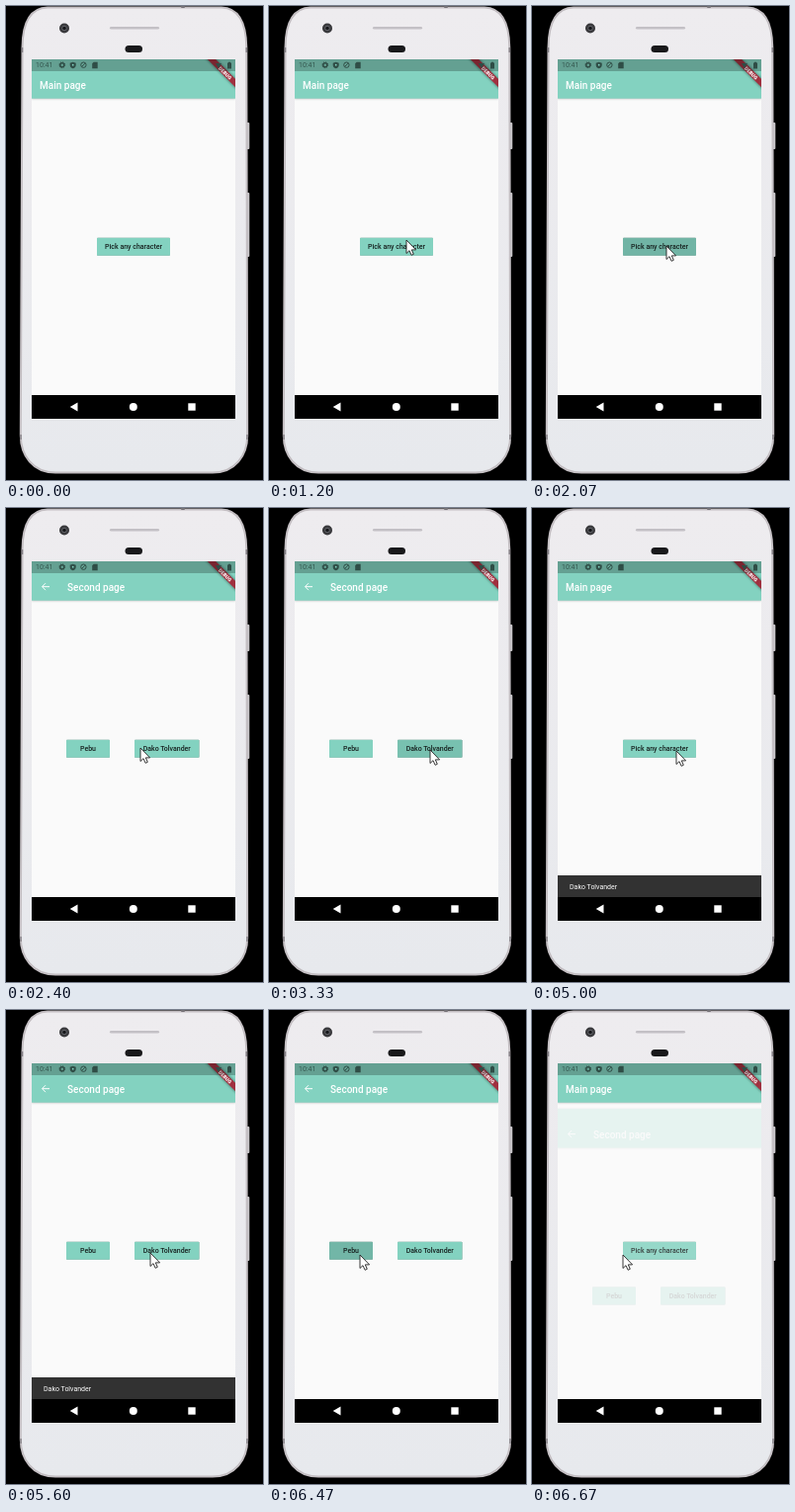
An HTML page that plays this animation: 260 by 480 pixels, repeating every 6740 ms.

```html
<!DOCTYPE html>
<html lang="en">
<head>
<meta charset="utf-8">
<style>
  html, body { margin: 0; width: 100%; height: 100%; overflow: hidden; background: #000; }
  svg { display: block; width: 260px; height: 480px; }
  text { font: 500 7px Roboto, sans-serif; fill: #16201e; }
  .title { font-size: 10px; fill: #fff; }
  .teal { fill: #83d2c0; }
  .raised { filter: drop-shadow(0 .8px .7px #0006); }
  .bar { filter: drop-shadow(0 .8px 1px #0005); }
  .snack text { font-weight: 400; fill: #fff; }
  .press { opacity: 0; }
</style>
</head>
<body>
<svg id="stage" viewBox="0 0 260 480"></svg>
<script>
const LOOP = 6740, STEP = 1000 / 15;
const PICKS = { short: 'Pebu', long: 'Dako Tolvander' };

const button = (id, x, width, label) => `
  <rect class="teal raised" x="${x}" y="234.700" width="${width}" height="18" rx=".8"/>
  <rect class="press" id="${id}" x="${x}" y="234.700" width="${width}" height="18" rx=".8"/>
  <text x="${x + width / 2}" y="246.300" text-anchor="middle">${label}</text>`;

const page = (id, title, titleX, content) => `
  <g id="${id}">
    <rect x="26" y="54" width="206" height="340" fill="#fafafa"/>
    <rect class="teal bar" x="26" y="54" width="206" height="39.700"/>
    <text class="title" x="${titleX}" y="83.800">${title}</text>
    ${content}
    <g class="snack">
      <rect x="26" y="372" width="206" height="22" fill="#323232"/>
      <text x="38" y="385.500">${PICKS.long}</text>
    </g>
  </g>`;

const phone = `
  <linearGradient id="shell" x2="0" y2="1">
    <stop stop-color="#eeecef"/><stop offset="1" stop-color="#e7e9ed"/>
  </linearGradient>
  <rect x="242" y="118" width="4.300" height="27" rx="1" fill="#c9c6ca"/>
  <rect x="242" y="189" width="4.300" height="65" rx="1" fill="#c9c6ca"/>
  <path d="M42 1.500C24 2 16.700 18 16.500 42L14.800 435C14.800 455 27 472.500 50 472.500H209
    C232 472.500 244.200 455 244.200 435L243.300 42C243 18 236 2 218 1.500Z"
    fill="url(#shell)" stroke="#c5c0c4" stroke-width="2"/>
  <path d="M16.500 42v5M243.300 42v5M15 434v5M244 434v5" stroke="#858186" stroke-width="1.500"/>
  <circle cx="59" cy="22.500" r="5" fill="#38383b"/>
  <circle cx="59" cy="22.500" r="2.300" fill="#17181b" stroke="#66676d"/>
  <rect x="105" y="21" width="50" height="2.500" rx="1.200" fill="#c3c0c5"/>
  <rect x="120.500" y="40" width="17.500" height="7" rx="3.500" fill="#19191b"/>
  <rect x="177" y="0" width="4" height="2" rx="1" fill="#77757a"/>`;

const debugBanner = `
  <g transform="translate(232 54) rotate(45)">
    <rect x="-30" y="14" width="60" height="6" fill="#a0303f" style="filter:drop-shadow(0 0 1.500px #0008)"/>
    <text x="2.500" y="19" text-anchor="middle" style="font-size:5.100px;font-weight:900;fill:#fff">DEBUG</text>
  </g>`;

const statusBar = `
  <rect x="26" y="54" width="206" height="12" opacity=".24"/>
  <g fill="#2f4d46" stroke="#2f4d46">
    <text x="30" y="62.300" stroke="none" style="fill:#34564e;font-weight:400">10:41</text>
    <circle cx="56.800" cy="59.700" r="2" fill="none" stroke-width="1.500"/>
    <circle cx="56.800" cy="59.700" r="2.900" fill="none" stroke-width="1" stroke-dasharray="1.100 1.180"/>
    <path d="M64.700 57.700l3-1 3 1v2q0 2.500-3 3.500-3-1-3-3.500z" stroke="none"/>
    <circle cx="67.700" cy="59.700" r=".9" fill="#83d3c1" stroke="none"/>
    <circle cx="78.400" cy="59.700" r="2.700" fill="none"/>
    <path d="M76.900 61.200l3-3"/>
    <path d="M87.200 58.200l1.500-1.500h4v6.500h-5.500z" stroke="none"/>
    <path d="M212 58h6l-3 5zM224 57.500h1v-.7h2v.7h1v6h-4z" stroke="none"/>
  </g>`;

const navBar = `
  <rect x="26" y="394" width="206" height="24"/>
  <g fill="#fff">
    <path d="M64.700 406l7.800-4.500v9z"/>
    <circle cx="128.800" cy="406" r="4"/>
    <rect x="184.300" y="402.300" width="7.400" height="7.400"/>
  </g>`;

const backArrow = '<path d="M44 79.700H36.800M40 76.200l-3.500 3.500 3.500 3.500" fill="none" stroke="#fff"/>';

stage.innerHTML = `
  <clipPath id="screen"><rect x="26" y="54" width="206" height="364"/></clipPath>
  ${phone}
  <g clip-path="url(#screen)">
    ${page('mainPage', 'Main page', 34, button('pickPress', 92, 74, 'Pick any character'))}
    ${page('secondPage', 'Second page', 62, backArrow
      + button('shortPress', 61, 44, PICKS.short) + button('longPress', 130, 65.5, PICKS.long))}
    ${debugBanner}${statusBar}${navBar}
  </g>
  <path id="cursor" d="M0 0V13.500L3 10.700 5.100 15.300 7.300 14.300 5.300 9.900H9.600Z"
    fill="#fff" stroke="#222" stroke-width=".9" stroke-linejoin="round"/>`;

const ramp = (t, from, to) => Math.min(1, Math.max(0, (t - from) / (to - from)));
const smooth = u => u * u * (3 - 2 * u);
const bump = (t, from, to) => Math.sin(Math.PI * ramp(t, from, to));

// Timing function of a CSS cubic-bezier, solved by bisection
const bezier = (x1, y1, x2, y2) => x => {
  const at = (a, b, s) => 3 * a * s * (1 - s) ** 2 + 3 * b * s * s * (1 - s) + s ** 3;
  let lo = 0, hi = 1;
  for (let i = 0; i < 24; i++) {
    const mid = (lo + hi) / 2;
    at(x1, x2, mid) < x ? lo = mid : hi = mid;
  }
  return at(y1, y2, (lo + hi) / 2);
};
const fastOutSlowIn = bezier(.4, 0, .2, 1), easeIn = bezier(.42, 0, 1, 1);

// Cursor stops: time, x, y
const PATH = [
  [600, 195, 25], [1200, 139, 237], [1535, 139, 237], [1733, 136, 243],
  [2735, 136, 243], [2867, 132, 241], [3133, 163, 245], [4467, 163, 245],
  [4867, 145, 240], [5000, 146, 246], [5600, 146, 246], [5933, 104, 242],
  [6067, 83, 246], [6200, 92, 248]
];

function cursorAt(t) {
  const next = PATH.findIndex(stop => stop[0] > t);
  if (next < 1) return PATH.at(next).slice(1);
  const [t0, x0, y0] = PATH[next - 1], [t1, x1, y1] = PATH[next];
  const u = smooth(ramp(t, t0, t1));
  return [x0 + (x1 - x0) * u, y0 + (y1 - y0) * u];
}

function draw(now) {
  const t = Math.floor((now % LOOP + 4) / STEP) * STEP;

  // Second page fades in while rising a quarter of the page height
  const shown = ramp(t, 2067, 2400) - ramp(t, 3423, 3723) + ramp(t, 5298, 5598) - ramp(t, 6467, 6767);
  secondPage.setAttribute('opacity', shown > .001 ? easeIn(shown) : 0);
  secondPage.setAttribute('transform', `translate(0 ${shown > .999 ? 0 : 85 * (1 - fastOutSlowIn(shown))})`);

  const snack = t < 6466 ? fastOutSlowIn(ramp(t, 3620, 3730)) : 0;
  for (const bar of document.querySelectorAll('.snack')) {
    bar.setAttribute('visibility', snack > .01 ? 'visible' : 'hidden');
    bar.setAttribute('transform', `translate(0 ${snack > .999 ? 0 : 22 * (1 - snack)})`);
  }

  pickPress.style.opacity = .14 * (bump(t, 1800, 2300) + bump(t, 5200, 5530));
  longPress.style.opacity = .14 * bump(t, 3267, 3600);
  shortPress.style.opacity = .14 * bump(t, 6333, 6667);

  cursor.setAttribute('visibility', t < 533 ? 'hidden' : 'visible');
  cursor.setAttribute('transform', `translate(${cursorAt(t)})`);
  requestAnimationFrame(draw);
}
draw(0);
</script>
</body>
</html>
```
